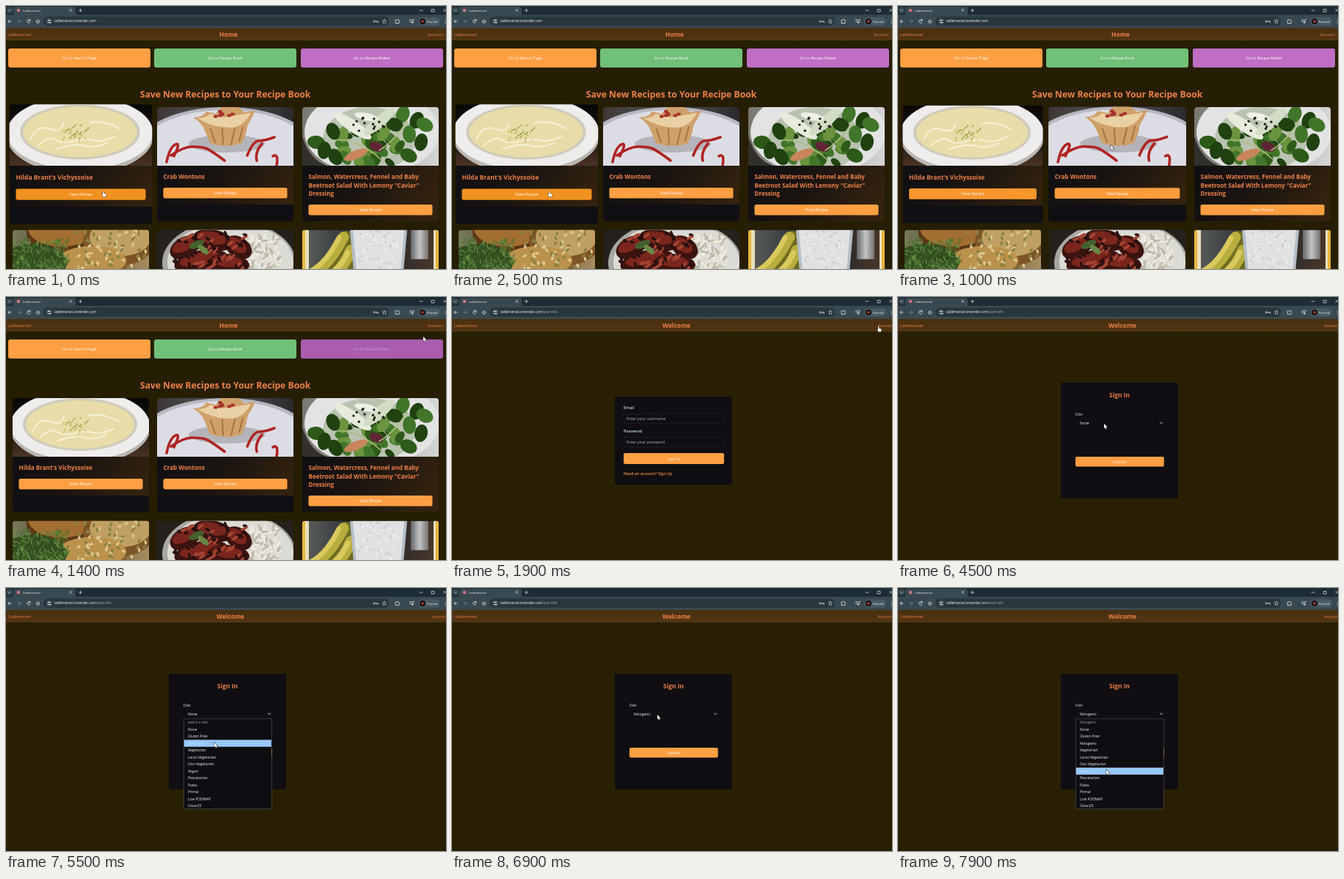
An HTML page with a canvas for the animation above (8000 ms loop, 600 by 359 pixels).

```html
<!DOCTYPE html>
<html lang="en">
<head>
<meta charset="utf-8">
<title>Recipe site demo</title>
<style>
html, body { margin: 0; width: 100%; height: 100%; overflow: hidden; background: #292003; }
canvas { display: block; width: 100vw; height: 100vh; }
</style>
</head>
<body>
<canvas id="stage"></canvas>
<script>
const W = 600, H = 359, LOOP = 8000;
const canvas = document.getElementById('stage');
const ctx = canvas.getContext('2d');
const ratio = window.devicePixelRatio || 1;
canvas.width = W * ratio;
canvas.height = H * ratio;

const BRAND = 'Ladlemarvel';
const ORANGE = '#ff9f43', ACCENT = '#ed8048', PANEL = '#100e12';
const DIETS = ['None', 'Gluten Free', 'Ketogenic', 'Vegetarian', 'Lacto-Vegetarian', 'Ovo-Vegetarian',
  'Vegan', 'Pescetarian', 'Paleo', 'Primal', 'Low FODMAP', 'Clean25'];

// ---- drawing helpers ----
function rect(x, y, w, h, fill, r = 0) {
  ctx.fillStyle = fill;
  ctx.beginPath();
  ctx.roundRect(x, y, w, h, r);
  ctx.fill();
}
function oval(x, y, rx, ry, fill, angle = 0) {
  ctx.fillStyle = fill;
  ctx.beginPath();
  ctx.ellipse(x, y, rx, ry, angle, 0, 7);
  ctx.fill();
}
function line(d, color, width = 0.8) {
  ctx.strokeStyle = color;
  ctx.lineWidth = width;
  ctx.lineCap = ctx.lineJoin = 'round';
  ctx.stroke(new Path2D(d));
}
function shape(d, fill) {
  ctx.fillStyle = fill;
  ctx.fill(new Path2D(d));
}
function text(s, x, y, size, color, weight = 400, align = 'left') {
  ctx.font = `${weight} ${size}px "Open Sans", sans-serif`;
  ctx.textAlign = align;
  ctx.textBaseline = 'alphabetic';
  ctx.fillStyle = color;
  ctx.fillText(s, x, y + size * 0.36);
}
function gradient(x0, y0, x1, y1, ...colors) {
  const g = ctx.createLinearGradient(x0, y0, x1, y1);
  colors.forEach((c, i) => g.addColorStop(i / (colors.length - 1), c));
  return g;
}
function mix(a, b, k) {
  return `rgb(${a.map((v, i) => Math.round(v + (b[i] - v) * k))})`;
}
function random(seed) {
  return () => (seed = (seed * 16807) % 2147483647) / 2147483647;
}
function scatter(seed, count, x, y, w, h, draw) {
  const rnd = random(seed);
  rnd();
  for (let i = 0; i < count; i++) draw(x + rnd() * w, y + rnd() * h, rnd());
}

// ---- food pictures, each 186 x 80 ----
function soup() {
  rect(0, 0, 186, 80, gradient(0, 0, 0, 80, '#080706', '#1b1410', '#4a3324'));
  oval(92, 40, 96, 51, '#b9b6b2');
  oval(92, 37, 95, 48, '#eeedec');
  oval(92, 36, 78, 36, '#cfcabb');
  oval(92, 36, 74, 33, '#e8dca8');
  line('M28 45Q36 26 52 32T70 24M38 53Q52 40 60 46T84 48T110 47T138 42M62 58Q85 50 98 54T128 50M104 24Q126 20 144 32', '#f6f0d4', 2);
  scatter(7, 30, 68, 27, 34, 18, (x, y, r) =>
    line(`M${x} ${y}l${8 * r - 3} ${7 - 12 * r}`, r > 0.5 ? '#8d9a3c' : '#b9bb58', 1));
}
function wonton() {
  rect(0, 0, 186, 80, gradient(0, 0, 186, 0, '#3d3836', '#57555a', '#2b292b'));
  oval(93, 54, 118, 54, '#b6b7c0');
  oval(93, 57, 114, 53, '#dcdde4');
  oval(95, 50, 52, 12, '#b5b3ba');
  line('M13 75Q17 55 25 51T23 67M19 66Q36 54 48 54T66 56T92 73M123 66Q131 46 139 46T160 41M143 50Q133 62 136 73M158 67Q166 62 163 80', '#b02423', 3.6);
  shape('M49 14Q61 15 67 6L80 9L88 0H111L119 7L134 5L128 17Q122 25 122 34L116 49Q95 57 72 49L65 32Q61 21 49 14Z', '#cfa06a');
  shape('M55 15Q68 15 72 9L91 14L116 10L128 8Q119 25 103 28Q77 29 55 15Z', '#ead0a5');
  line('M73 30L79 48M89 30L90 51M106 29L101 51M117 27L112 46', '#a7743f', 2);
  scatter(11, 7, 72, 5, 36, 11, (x, y) => oval(x, y, 3, 2, '#a6322a'));
}
function salad() {
  rect(0, 0, 186, 80, gradient(0, 0, 186, 0, '#77766f', '#aaa9a5', '#d5d5d5'));
  shape('M0 40Q10 72 34 80H0Z', '#33302b');
  oval(95, 34, 92, 58, '#e2e3e2');
  oval(91, 44, 63, 44, '#bac2b0');
  const greens = ['#1f4210', '#2d5a19', '#41752a', '#6b943e'];
  scatter(23, 32, 52, 34, 82, 44, (x, y, r) =>
    oval(x, y, 7 + r * 5, 4 + r * 4, greens[Math.floor(r * 4)], r * 6));
  for (const [x, y] of [[19, 48], [30, 59], [45, 68], [42, 33], [137, 10], [156, 18], [167, 24], [146, 37], [162, 48], [145, 66], [126, 24]])
    oval(x, y, 12, 9, greens[x % 3], x);
  oval(69, 26, 30, 8, '#e6ebdb', 0.6);
  oval(105, 20, 27, 8, '#d3dcc4', -0.7);
  oval(87, 13, 16, 5, '#edf0e6', 0.2);
  oval(73, 65, 17, 6, '#c9855c', -0.4);
  oval(101, 54, 10, 6, '#622535', 0.4);
  line('M48 45Q75 43 108 72M105 59Q125 47 143 19', '#a8bd7b', 1.5);
  scatter(5, 14, 66, 14, 48, 20, (x, y) => oval(x, y, 1.7, 1.7, '#1f221d'));
}
function muffins() {
  rect(0, 0, 186, 80, gradient(0, 0, 186, 0, '#77785a', '#4f4528', '#a78e62'));
  oval(67, 4, 48, 31, '#5d3615');
  oval(67, -2, 46, 25, '#a36e31');
  oval(145, 16, 49, 33, '#7d5426');
  oval(147, 10, 42, 26, '#c0a062');
  oval(104, 48, 52, 25, '#81602a');
  oval(109, 42, 46, 20, '#bb924b');
  scatter(31, 70, 83, 0, 100, 54, (x, y, r) => oval(x, y, 3, 1.7, r > 0.5 ? '#8b8144' : '#dcc68e', r * 6));
  oval(29, 45, 45, 26, '#334f20');
  scatter(13, 150, 0, 16, 75, 42, (x, y, r) =>
    line(`M${x} ${y}l${r * 14 - 7} -${3 + r * 5}`, r > 0.5 ? '#48712d' : '#6d9347', 1.2));
}
function chicken() {
  rect(0, 0, 186, 80, '#25211d');
  oval(98, 45, 91, 58, '#a9a7a2');
  oval(100, 44, 86, 54, '#dcdad5');
  scatter(3, 120, 116, 8, 52, 46, (x, y, r) => oval(x, y, 4, 1.4, r > 0.5 ? '#eeeae0' : '#bdb8a8', x));
  for (const [x, y, rx, ry, a] of [[38, 24, 22, 14, -0.5], [77, 14, 28, 14, 0.2], [60, 43, 37, 15, -0.2], [111, 24, 20, 14, 0.6], [98, 46, 28, 13, 0.1]]) {
    oval(x, y, rx, ry, '#3b1310', a);
    oval(x - 2, y - 3, rx * 0.75, ry * 0.6, '#7b261d', a);
  }
  scatter(19, 50, 24, 5, 96, 48, (x, y, r) => oval(x, y, 3 + r * 3, 1.8, r > 0.6 ? '#a64735' : '#25100e', r * 3));
  oval(54, 20, 11, 5, '#44602f', -0.4);
  oval(63, 27, 9, 4, '#6a8745', 0.7);
}
function smoothie() {
  rect(0, 0, 186, 80, gradient(0, 0, 186, 0, '#5e615d', '#30353a', '#2b292b', '#4b382a'));
  rect(148, 0, 24, 40, gradient(148, 0, 172, 0, '#65666a', '#c3c4c5', '#75716c'));
  rect(0, 0, 9, 80, '#e9e0bd');
  rect(0, 0, 4, 80, '#e7b53d');
  rect(179, 0, 7, 80, '#e9e0bd');
  rect(182, 0, 4, 80, '#e7b53d');
  line('M14 66Q41 56 60 12M27 74Q61 64 70 26', '#6d6b22', 21);
  line('M13 60Q37 48 56 10M28 70Q55 58 66 28', '#b8ae3d', 15);
  line('M14 55Q33 44 50 11M30 65Q52 54 62 31', '#d9c95c', 7);
  shape('M65 0H143L136 80H72Z', '#b5bdc5');
  shape('M69 0H139L132 80H76Z', '#dfe1e2');
  scatter(41, 60, 74, 0, 56, 54, (x, y, r) => oval(x, y, 1.2, 1.2, r > 0.5 ? '#f4f4f2' : '#c2c5c9'));
}

// ---- browser frame ----
function browserFrame(path) {
  rect(0, 0, W, 30, '#1e2d35');
  rect(1, 1.5, 8, 8.5, '#36474f', 2.5);
  rect(10, 1, 85, 14, '#394951', 3);
  rect(0, 12, W, 18, '#394951');
  rect(51, 14.5, 471, 12.5, '#28363d', 6);
  oval(59, 21, 4.6, 4.6, '#394951');
  line('M2.9 5.2l1.7 1.7 1.7-1.7', '#d9e0e3', 0.7);
  oval(17, 6, 2.3, 2.3, '#d0757f');
  text(BRAND, 23, 6, 4.2, '#f1f4f5', 500);
  line('M86.7 4.2l3.2 3.2m0-3.2l-3.2 3.2M99.5 6h4M101.5 4v4M564 6h4M580.5 4.5h3.5v3.5h-3.5zM596.8 4.2l3.2 3.2m0-3.2l-3.2 3.2', '#e1e7e9', 0.7);
  line('M7 21H3m2-2l-2 2 2 2', '#e1e7e9');
  line('M16 21h4m-2-2l2 2-2 2', '#7c8a90');
  line('M32.7 19.5a2.3 2.3 0 1 0 .4 2.2M33 18v2h-2M41 21l2.5-2.5L46 21M42 20.5V23h3v-2.5M57 19.5h4M57 22.5h4', '#e1e7e9');
  oval(58, 19.5, 0.9, 0.9, '#e1e7e9');
  oval(60, 22.5, 0.9, 0.9, '#e1e7e9');
  const host = 'ladlemarvel.onrender.com';
  text(host, 66, 20.8, 4.6, '#fff', 500);
  if (path) {
    const end = 66 + ctx.measureText(host).width;
    text(path, end, 20.8, 4.6, '#a9b5ba');
  }
  line('M503.5 21h4v1.2M506 21v1', '#d9e0e3');
  line('M502 19.9a1.1 1.1 0 1 0 .1 0', '#d9e0e3');
  line('M516 18.2l.8 1.8 2 .2-1.5 1.3.5 2-1.8-1-1.8 1 .5-2-1.5-1.3 2-.2z', '#d9e0e3', 0.6);
  line('M531.5 19h1.5q.5-1.5 1.5 0H536v1.5q1.4.5 0 1.5v1.5h-4.5z', '#e1e7e9');
  line('M550.5 19h3M550.5 21h2M555 22.5v-4h1.5', '#e1e7e9');
  oval(554, 22.5, 1.3, 1.1, '#e1e7e9');
  rect(562, 15.5, 30, 11, '#495a63', 5.5);
  oval(568, 21, 4, 4, '#151516');
  oval(568, 21, 1.8, 1.8, '#b93a33');
  text('Paused', 574, 21, 4.2, '#f3f5f6', 500);
  for (const y of [19, 21, 23]) oval(599.3, y, 0.6, 0.6, '#e1e7e9');
}
function pageHeader(title, titleX, accountX) {
  rect(0, 30, W, 17, gradient(0, 30, 0, 47, '#49300f', '#533513'));
  text(BRAND, 3, 38.7, 5.4, ACCENT, 500);
  text(title, titleX, 38.9, 8.4, ACCENT, 700, 'center');
  text('Account', accountX, 38.7, 5.4, ACCENT, 500);
}

// ---- home page ----
const CARDS = [
  { x: 9, y: 138, lines: ["Hilda Brant's Vichyssoise"], picture: soup },
  { x: 206, y: 138, lines: ['Crab Wontons'], picture: wonton },
  { x: 404, y: 138, lines: ['Salmon, Watercress, Fennel and Baby', 'Beetroot Salad With Lemony "Caviar"', 'Dressing'], picture: salad },
  { x: 9, y: 305.5, lines: [], picture: muffins },
  { x: 206, y: 305.5, lines: [], picture: chicken },
  { x: 404, y: 305.5, lines: [], picture: smoothie }
];

// Linear hover transition: fades in after `on`, back out after `off`.
function hover(t, on, off, duration) {
  const grow = Math.min(1, Math.max(0, (Math.min(t, off) - on) / duration));
  return Math.max(0, grow - Math.max(0, t - off) / duration);
}
function card({ x, y, lines, picture }, lift) {
  const w = 186, h = 156, scale = 1 + 0.048 * lift;
  ctx.save();
  ctx.translate(x + w / 2, y + h / 2);
  ctx.scale(scale, scale);
  ctx.translate(-w / 2, -h / 2);
  ctx.beginPath();
  ctx.roundRect(0, 0, w, h, 4);
  ctx.clip();
  rect(0, 0, w, h, '#100f13');
  const buttonY = 98.5 + 11.5 * lines.length;
  rect(0, 80, w, buttonY - 57, gradient(20, 60, 160, 150, '#100f12', '#1c1510', '#33220f'));
  lines.forEach((s, i) => text(s, 8.5, 95.2 + 11.5 * i, 8.1, ACCENT, 700));
  rect(8.5, buttonY, 169, 14.5, mix([255, 159, 67], [241, 145, 32], lift), 2.5);
  text('View Recipe', w / 2, buttonY + 7.3, 5.55, '#fff', 500, 'center');
  ctx.beginPath();
  ctx.rect(0, 0, w, 80);
  ctx.clip();
  picture();
  ctx.restore();
}
function homePage(t) {
  rect(0, 0, W, H, '#261e03');
  browserFrame('');
  pageHeader('Home', 303.5, 575);
  const purple = hover(t, 1270, 1380, 100);
  const links = [
    ['Go to Search Page', 3, ORANGE, '#fff'],
    ['Go to Recipe Book', 202, '#70c077', '#fff'],
    ['Go to Recipe Maker', 402, mix([191, 110, 196], [164, 88, 170], purple), mix([255, 255, 255], [164, 88, 170], purple * 0.7)]
  ];
  for (const [label, x, fill, color] of links) {
    rect(x, 58, 194, 26, fill, 3);
    text(label, x + 97, 71.4, 5.5, color, 500, 'center');
  }
  text('Save New Recipes to Your Recipe Book', 299, 120.5, 12.2, ACCENT, 700, 'center');
  const lifts = [hover(t, -400, 880, 300), hover(t, 940, 1070, 300), hover(t, 1070, 1160, 300)];
  CARDS.forEach((c, i) => card(c, lifts[i] || 0));
}

// ---- account pages ----
function accountFrame() {
  rect(0, 0, W, H, '#292003');
  browserFrame('/user-info');
  pageHeader('Welcome', 306, 581);
}
function field(label, hint, y) {
  text(label, 234, y, 5.4, '#cfdbe2', 600);
  rect(234, y + 7.5, 137, 14, '#2b2623', 2);
  rect(234.5, y + 8, 136, 13, PANEL, 2);
  text(hint, 238, y + 14.5, 5.4, '#b5bbc1');
}
function signInPage(t) {
  accountFrame();
  rect(222, 136, 160, 120, PANEL, 2);
  field('Email', 'Enter your username', 151.5);
  field('Password', 'Enter your password', 183.5);
  rect(234, 213, 137, 15, t > 2360 ? '#f19120' : ORANGE, 2.5);
  text('Sign In', 302.5, 220.5, 5.6, '#fff5e8', 400, 'center');
  text('Need an account? Sign Up', 234, 241, 5.3, '#f5943b', 600);
}
function dietPage(t, pointerY) {
  accountFrame();
  rect(222, 117, 160, 158, PANEL, 2);
  text('Sign In', 302, 134, 8.4, ACCENT, 700, 'center');
  text('Diet', 242, 160.5, 5, '#e3e6ea', 500);
  const value = t < 3800 ? 'select a diet' : t < 5700 ? 'None' : 'Ketogenic';
  text(value, 248, 172, 5, '#f2f2f4', 500);
  line('M357.4 171l1.7 1.7 1.7-1.7', '#f2f2f4');
  rect(242, 218, 120.7, 13.5, ORANGE, 2);
  text('Update', 302, 224.8, 5.4, '#fff5e8', 400, 'center');
  const open = (t >= 3100 && t < 3800) || (t >= 4800 && t < 5700) || t >= 7150;
  if (open) dropdown(t < 5700 ? 'select a diet' : 'Ketogenic', pointerY);
}
function dropdown(placeholder, pointerY) {
  const top = 183.5, step = 9.5;
  const active = Math.round((pointerY - top) / step);
  rect(242, 178, 120.5, 123.5, '#5a595c', 1);
  rect(242.6, 178.6, 119.3, 122.3, '#0e0d11', 1);
  ctx.save();
  ctx.beginPath();
  ctx.rect(242.6, 178.6, 119.3, 122.3);
  ctx.clip();
  [placeholder, ...DIETS].forEach((name, i) => {
    const y = top + step * i;
    if (i === active) rect(242.6, y - 4.8, 119.3, step, i ? '#98c8fb' : '#232226');
    text(name, 248, y, 4.95, i === 0 ? '#a3a3a6' : i === active ? '#b4d6fa' : '#f4f4f5', 500);
  });
  ctx.restore();
}

// ---- pointer: time, x, y of its tip ----
const POINTER = [
  [0, 132, 253], [820, 132, 253], [1000, 290, 190], [1180, 450, 135], [1300, 530, 76], [1400, 569, 54],
  [1600, 581, 40], [1950, 581, 40], [2350, 301, 219], [2550, 301, 219], [2800, 276, 172], [3200, 276, 173],
  [3400, 275, 184], [3600, 262, 192], [3850, 262, 192], [4400, 281, 173], [4900, 281, 173], [5500, 284, 211],
  [5750, 284, 211], [6200, 281, 173], [6890, 281, 173], [6900, 280, 173], [7200, 280, 173], [7900, 284, 248], [8000, 284, 248]
];
function pointerAt(t) {
  const i = POINTER.findIndex(key => key[0] > t);
  const [t0, x0, y0] = POINTER[i - 1], [t1, x1, y1] = POINTER[i];
  const k = (t - t0) / (t1 - t0), eased = k * k * (3 - 2 * k);
  return [x0 + (x1 - x0) * eased, y0 + (y1 - y0) * eased];
}
function drawPointer(x, y, hand) {
  const arrow = 'M0 0V6.3L1.5 5L2.5 7.3L3.5 6.8L2.5 4.7H4.5Z';
  const finger = 'M0 .6Q.7-.4 1.4.6V3L4 3.6Q4.8 4 4.6 5L4 7.5H.8L-1.2 4.8Q-1 3.8 0 4.5Z';
  const d = hand ? finger : arrow;
  ctx.save();
  ctx.translate(x, y);
  line(d, '#222', 0.9);
  shape(d, '#fff');
  ctx.restore();
}

function draw() {
  const t = performance.now() % LOOP;
  const [x, y] = pointerAt(t);
  ctx.setTransform(ratio, 0, 0, ratio, 0, 0);
  if (t < 1900) homePage(t);
  else if (t < 2500) signInPage(t);
  else dietPage(t, y);
  drawPointer(x, y, t < 860 || (t > 1500 && t < 2000) || (t > 2300 && t < 2500));
  requestAnimationFrame(draw);
}
draw();
</script>
</body>
</html>
```
